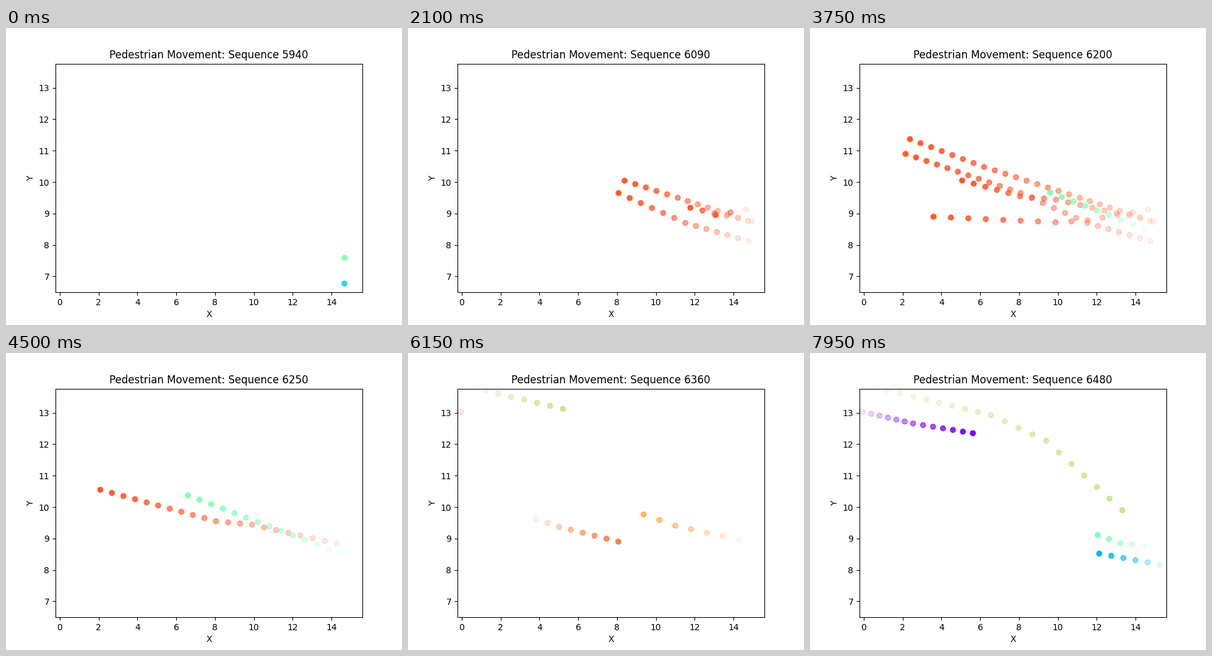
Write a matplotlib script that moves like this. It is 640 px wide and 480 px high and loops after 8 s.

```python
import numpy as np
import matplotlib.pyplot as plt
from matplotlib.animation import FuncAnimation

plt.rcParams["font.family"] = "DejaVu Sans"

TICK_MS = 50
TICKS_PER_STEP = 3
LOOP_MS = 8000
FIRST_SEQUENCE = 5940

# Positions on the rainbow colour map
PURPLE, BLUE, CYAN, MINT, GREEN, ORANGE, CORAL, RED = (
    0, 0.26, 0.33, 0.5, 0.63, 0.75, 0.833, 0.885)

fig, ax = plt.subplots(figsize=(6.4, 4.8), dpi=100)
ax.set_xlim(-0.2215, 15.5935)
ax.set_ylim(6.492, 13.768)
ax.set_xlabel("X")
ax.set_ylabel("Y")
title = ax.set_title("")

walkers = []


def add_walker(hue, *turns):
    """Walk at an even pace between turning points (step, x, y)."""
    steps, xs, ys = np.transpose(turns)
    grid = np.arange(steps[0], steps[-1] + 1)
    path = np.column_stack([np.interp(grid, steps, xs), np.interp(grid, steps, ys)])
    dots = ax.scatter([], [])
    walkers.append((int(steps[0]), path, plt.cm.rainbow(float(hue)), dots))


# Two walkers at the right edge, coming from outside the view
for hue, y in ((MINT, 7.59), (CYAN, 6.77)):
    add_walker(hue, (-1, 17, y), (0, 14.67, y), (1, 15.27, y - 0.3))

# Group heading left
add_walker(RED, (1, 14.93, 8.74), (2, 14.74, 8.77), (9, 11.13, 9.5),
           (18, 6.2, 10.48), (29, 0.2, 11.87))
add_walker(RED, (2, 14.78, 8.12), (8, 11.52, 8.7), (14, 8.08, 9.65), (29, 0, 11.35))
add_walker(RED, (10, 14.27, 8.84), (17, 9.91, 9.44), (20, 8.05, 9.55), (33, 0.3, 10.85))
add_walker(RED, (12, 14.63, 9.12), (16, 11.53, 8.78), (18, 9.88, 8.72), (29, 0, 9))
add_walker(MINT, (17, 14.5, 8.51), (21, 12, 9.1), (33, 4.8, 10.8))

# Walkers crossing both ways
add_walker(GREEN, (34, 0.55, 13.8), (43, 6.55, 12.93), (47, 9.4, 12.11), (53, 13.32, 9.9))
add_walker(CORAL, (34, 3.83, 9.62), (36, 5.01, 9.37), (44, 9.9, 8.62), (52, 14.97, 6.86))
add_walker(ORANGE, (35, 14.26, 8.97), (39, 11, 9.41), (42, 8.55, 9.94), (52, 0.25, 10.76))
add_walker(PURPLE, (41, -0.05, 13.03), (47, 2.54, 12.66), (53, 5.62, 12.35))

# Late arrivals from the right
add_walker(BLUE, (48, 15.25, 8.17), (53, 12.13, 8.52))
add_walker(MINT, (49, 14.4, 8.77), (51, 13.23, 8.85), (53, 12.05, 9.11))


def trail_colors(color, count):
    rgba = np.tile(color, (count, 1))
    rgba[:, 3] = np.linspace(0.1, 1, count)
    return rgba


def update(tick):
    step = tick // TICKS_PER_STEP
    # One empty sequence is skipped right after the first step.
    sequence = FIRST_SEQUENCE + 10 * (step + (step > 0))
    title.set_text(f"Pedestrian Movement: Sequence {sequence}")
    for start, path, color, dots in walkers:
        count = step - start + 1
        present = 0 < count <= len(path)
        dots.set_visible(present)
        if present:
            dots.set_offsets(path[:count])
            dots.set_color(trail_colors(color, count))
    return [title] + [walker[-1] for walker in walkers]


anim = FuncAnimation(fig, update, frames=LOOP_MS // TICK_MS,
                     interval=TICK_MS, repeat=True, repeat_delay=0)
plt.show()
```
